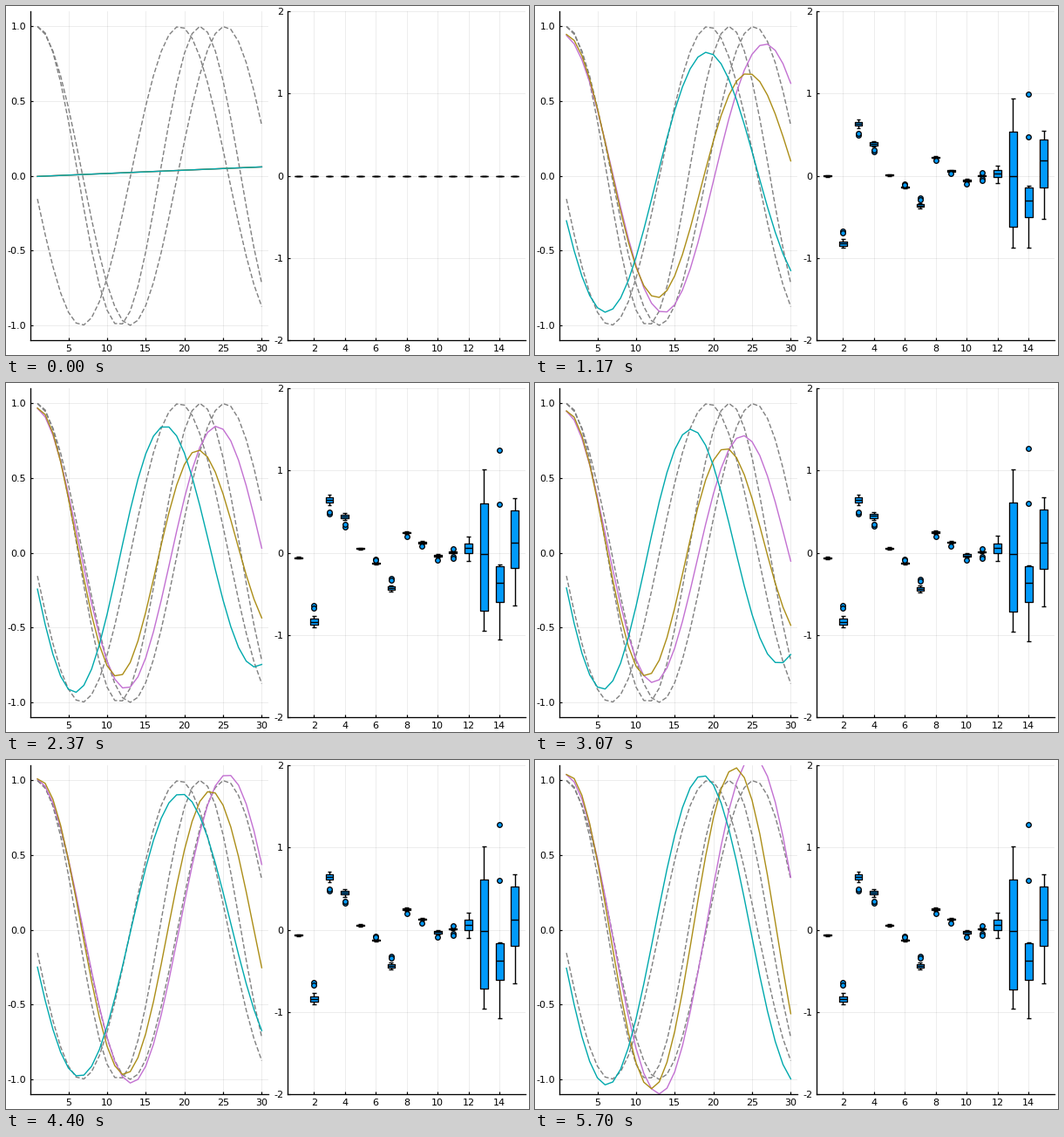
A matplotlib script that plays this animation: 600x400 px, repeating every 5730 ms.

```python
import numpy as np
import matplotlib.pyplot as plt
from matplotlib.animation import FuncAnimation
from matplotlib.collections import LineCollection, PolyCollection

W, H, DPI = 600, 400, 100
LOOP, STEP = 5730, 30
PX = 72 / DPI  # one pixel in points
WARMUP = 670   # ms of steady growth before values settle
KEYS = np.array([0, WARMUP, 1630, 3070, 3770, 5030, 5700])
BLUE = "#009afa"

plt.rcParams.update({
    "font.family": "DejaVu Sans", "font.size": 8,
    "axes.unicode_minus": False, "axes.linewidth": 1.3 * PX,
})


def glide(values, t):
    """Monotone cubic through the values at KEYS."""
    v, h = np.array(values), np.diff(KEYS)
    d = np.diff(v) / h
    m = np.zeros(len(v))
    m[0], m[-1] = d[0], d[-1]
    same = d[:-1] * d[1:] > 0
    m[1:-1][same] = 2 * (d[:-1] * d[1:])[same] / (d[:-1] + d[1:])[same]
    i = np.clip(np.searchsorted(KEYS, t, side="right") - 1, 0, len(h) - 1)
    s = (t - KEYS[i]) / h[i]
    return ((1 + 2 * s) * (1 - s) ** 2 * v[i] + s * (1 - s) ** 2 * h[i] * m[i]
            + s * s * (3 - 2 * s) * v[i + 1] + s * s * (s - 1) * h[i] * m[i + 1])


def evolve(early, late, t):
    """Grow linearly to the early value, then settle towards the late one."""
    settle = 1 - np.exp(-max(t - WARMUP, 0) / 550)
    return np.multiply(early, min(t / WARMUP, 1)) + np.subtract(late, early) * settle


# Observed waves: phase at x = 1 and angular step
xs = np.arange(1, 31)
OBSERVED = [(0, .2985), (.07, .2565), (1.726, .248)]

# Fitted waves share their starting amplitude; step and end amplitude drift
GAIN = [0, .82, .99, .95, 1.02, 1, 1.04]
FITS = [
    dict(color="#c371d2", phase=.07, lag=.18,
         step=[.12, .2067, .2565, .271, .244, .264, .258],
         end=[0, .80, .90, .74, 1.03, 1.06, 1.18]),
    dict(color="#ac8e18", phase=-.05, lag=.12,
         step=[.12, .2137, .293, .305, .269, .297, .291],
         end=[0, .69, .57, .60, .89, .92, 1.10]),
    dict(color="#00a9ad", phase=1.82, lag=.26,
         step=[.12, .2155, .253, .275, .232, .25, .2535],
         end=[0, .66, .79, .73, .95, .75, 1.03]),
]


def wave(fit, t):
    u = (xs - 1) / 29
    amp = glide(GAIN, t) * (1 - u) + glide(fit["end"], t) * u
    phase = fit["phase"] + fit["lag"] * np.exp(-max(t - WARMUP, 0) / 400)
    first_guess = max(1 - t / 600, 0) * (-.004 + .0022 * (xs - 1))
    return first_guess + amp * np.cos(phase + glide(fit["step"], t) * (xs - 1))


# Boxes 1 to 11: early and late median, half height of the box
EARLY = [.095, -.80, .615, .30, -.055, -.155, -.25, .185, -.045, -.10, -.005]
LATE = [-.065, -.84, .645, .45, .055, -.125, -.44, .25, .13, -.03, .01]
HALF = [.006, .035, .032, .023, .006, .008, .02, .009, .009, .012, .008]
FAR = {2: [.20, .165], 3: [-.175, -.148], 4: [-.128, -.10], 6: [.05, .035],
       7: [.12, .10], 8: [-.05], 9: [-.045], 10: [-.055], 11: [.04, -.055, -.075]}

# Boxes 12 to 15: low, q1, median, q3, high and far points; early, then late
WIDE = {
    12: [(-.065, -.04, -.025, -.015, -.01, .035), (-.10, 0, .06, .12, .21, .10)],
    13: [(-.755, -.48, 0, .44, .81), (-.96, -.72, -.01, .61, 1.02)],
    14: [(-.555, -.345, -.21, -.10, -.075, .275, .58),
         (-1.08, -.605, -.37, -.165, -.15, .60, 1.28)],
    15: [(-.345, -.07, .28, .31, .365), (-.65, -.195, .12, .53, .68)],
}


def box_stats(k, t):
    """Five box values and the points outside the whisker fences."""
    if k in WIDE:
        values = evolve(*WIDE[k], t)
        stats, far = values[:5], values[5:]
    else:
        mid = evolve(EARLY[k - 1], LATE[k - 1], t)
        grow = evolve(.45, 1, t)
        stats = mid + grow * HALF[k - 1] * np.array([-2, -1, 0, 1, 2])
        far = mid + grow * np.array(FAR.get(k, []))
    lo, q1, med, q3, hi = stats
    fence = 1.5 * (q3 - q1)
    inside = (far >= q1 - fence) & (far <= q3 + fence)
    lo, hi = min([lo, *far[inside]]), max([hi, *far[inside]])
    return lo, q1, med, q3, hi, far[~inside]


fig = plt.figure(figsize=(W / DPI, H / DPI), dpi=DPI, facecolor="white")


def panel(left, right, xlim, ylim, xticks, yticks, fmt):
    top, bottom = 6.15, 383.15
    ax = fig.add_axes([left / W, 1 - bottom / H, (right - left) / W, (bottom - top) / H])
    ax.set(xlim=xlim, ylim=ylim)
    ax.set_xticks(xticks, [str(v) for v in xticks])
    ax.set_yticks(yticks, [fmt % v for v in yticks])
    ax.spines[["top", "right"]].set_visible(False)
    ax.set_axisbelow(True)
    ax.grid(color="black", alpha=.1, lw=.7 * PX)
    ax.tick_params(direction="in", length=3 * PX, width=1.2 * PX, pad=5 * PX)
    return ax


left = panel(28.35, 301.1, (.13, 30.87), (-1.1, 1.1),
             range(5, 31, 5), [-1, -.5, 0, .5, 1], "%.1f")
right = panel(323.1, 596.1, (.3, 15.69), (-2, 2), range(2, 15, 2), range(-2, 3), "%d")

for phase, step in OBSERVED:
    left.plot(xs, np.cos(phase + step * (xs - 1)), color="#808080", lw=1.4 * PX,
              dashes=(3.8, 1.8), dash_capstyle="butt")
curves = [left.plot(xs, wave(f, 0), color=f["color"], lw=1.4 * PX)[0] for f in FITS]

bodies = PolyCollection([], facecolor=BLUE, edgecolor="black", lw=1.3 * PX, zorder=3)
strokes = LineCollection([], color="black", lw=1.4 * PX, zorder=4)
right.add_collection(bodies, autolim=False)
right.add_collection(strokes, autolim=False)
dots, = right.plot([], [], "o", ms=5.6 * PX, mfc=BLUE, mec="black", mew=1.3 * PX, zorder=5)

BODY, CAP = .25, .14  # half widths


def update(i):
    t = i * STEP
    for line, fit in zip(curves, FITS):
        line.set_ydata(wave(fit, t))
    polys, segs, pts = [], [], []
    for k in range(1, 16):
        lo, q1, med, q3, hi, far = box_stats(k, t)
        a, b = k - BODY, k + BODY
        polys.append([(a, q1), (b, q1), (b, q3), (a, q3)])
        segs += [[(k, lo), (k, q1)], [(k, q3), (k, hi)], [(a, med), (b, med)]]
        segs += [[(k - CAP, y), (k + CAP, y)] for y in (lo, hi)]
        pts += [(k, y) for y in far]
    bodies.set_verts(polys)
    strokes.set_segments(segs)
    dots.set_data([p[0] for p in pts], [p[1] for p in pts])
    return [*curves, bodies, strokes, dots]


anim = FuncAnimation(fig, update, frames=LOOP // STEP, interval=STEP,
                     repeat=True, repeat_delay=0, blit=False)
plt.show()
```
